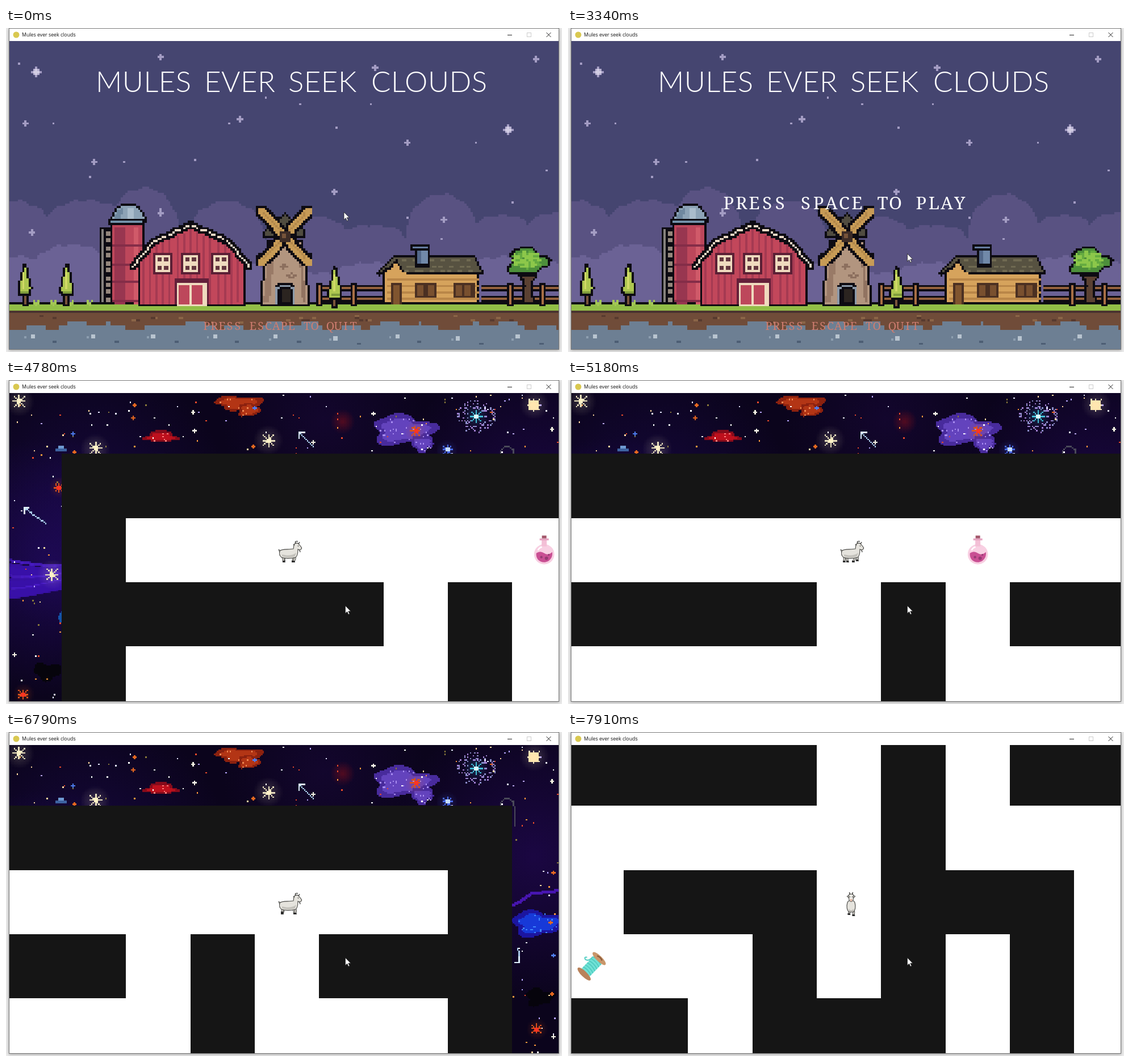
An HTML page with a canvas for the animation above (7990 ms loop, 979 by 572 pixels).

```html
<!DOCTYPE html>
<html lang="en">
<head>
<meta charset="utf-8">
<title>Mules ever seek clouds</title>
<style>
html, body { margin: 0; width: 100%; height: 100%; overflow: hidden; background: #ebebeb; }
#stage { position: relative; width: 979px; height: 572px; overflow: hidden; }
#frame { position: absolute; left: 5px; top: 0; width: 967px; height: 566px; border: 1px solid #777; background: #fff; box-shadow: 0 1px 5px #0005; }
canvas, svg { position: absolute; left: 0; top: 0; }
.pixels { left: 6px; top: 23px; width: 967px; height: 544px; image-rendering: pixelated; }
.typed { font-family: "Noto Serif", serif; font-weight: 100; text-anchor: middle; }
</style>
</head>
<body>
<div id="stage">
  <div id="frame"></div>
  <canvas id="farm" class="pixels" width="256" height="144"></canvas>
  <canvas id="space" class="pixels" width="384" height="216"></canvas>
  <canvas id="maze" width="979" height="572"></canvas>
  <svg width="979" height="572">
    <circle cx="18" cy="12" r="5.5" fill="#d9c850"/>
    <text x="28" y="15" font-size="8.8" font-family="'Open Sans', 'Noto Sans', sans-serif" fill="#111">Mules ever seek clouds</text>
    <path d="M883 12.5h8M951.5 8l8 8M959.5 8l-8 8" stroke="#222" fill="none"/>
    <rect x="917.5" y="8.5" width="7" height="7" stroke="#ccc" fill="none"/>
    <g id="menu">
      <text y="113" font-size="51" font-weight="300" font-family="Lato, sans-serif" letter-spacing=".5" fill="#fff"><tspan x="158">MULES</tspan><tspan x="349">EVER</tspan><tspan x="497">SEEK</tspan><tspan x="643">CLOUDS</tspan></text>
      <text id="play" class="typed" y="319.5" font-size="31" fill="#fff">PRESS SPACE TO PLAY</text>
      <text id="quit" class="typed" y="533" font-size="19.5" fill="#cf7d70">PRESS ESCAPE TO QUIT</text>
    </g>
    <path id="cursor" d="M0 0V13.500L3.200 10.600L5.400 15.500L7.500 14.500L5.300 9.800H9.500Z" fill="#fff" stroke="#222" stroke-width=".8"/>
  </svg>
</div>
<script>
const $ = id => document.getElementById(id);
const random = seed => () => (seed = seed * 16807 % 2147483647) / 2147483647;
const repeat = (n, f) => { for (let i = 0; i < n; i++) f(i); };
const clamp = (v, lo, hi) => Math.min(hi, Math.max(lo, v));
// Outline mirrored about x = cx, from points [offset, y].
const mirror = (cx, half) => [...half.map(([d, y]) => [cx + d, y]), ...half.map(([d, y]) => [cx - d, y]).reverse()];
// Lobed closed outline.
const lobed = (x, y, rx, ry, wave) => Array.from({ length: 48 }, (_, i) => {
  const a = i * Math.PI / 24, r = 1 + .16 * Math.sin(3 * a + wave) + .12 * Math.sin(5 * a + 2 * wave);
  return [x + Math.cos(a) * rx * r, y + Math.sin(a) * ry * r];
});

// Blocky painter: takes stage coordinates, snaps them to cells of size k.
function painter(id, k) {
  const g = $(id).getContext('2d');
  const X = x => Math.round((x - 5) / k), Y = y => Math.round((y - 23) / k);
  const S = n => Math.max(1, Math.round(n / k));
  const box = (c, x, y, w = k, h = w) => { g.fillStyle = c; g.fillRect(X(x), Y(y), S(w), S(h)); };
  const line = (c, pts, w = k) => {
    for (let i = 1; i < pts.length; i++) {
      const [x, y] = pts[i - 1], dx = pts[i][0] - x, dy = pts[i][1] - y;
      const n = Math.ceil(Math.max(Math.abs(dx), Math.abs(dy)) / k) || 1;
      repeat(n + 1, j => box(c, x + dx * j / n - w / 2, y + dy * j / n - w / 2, w));
    }
  };
  const poly = (c, pts, edge) => {
    const q = pts.map(([x, y]) => [(x - 5) / k, (y - 23) / k]), ys = q.map(p => p[1]);
    g.fillStyle = c;
    for (let r = Math.floor(Math.min(...ys)); r <= Math.max(...ys); r++) {
      const m = r + .5, xs = [];
      q.forEach(([x, y], i) => {
        const [a, b] = q[(i + 1) % q.length];
        if ((y <= m) !== (b <= m)) xs.push(Math.round(x + (m - y) * (a - x) / (b - y)));
      });
      xs.sort((a, b) => a - b);
      for (let i = 0; i + 1 < xs.length; i += 2) g.fillRect(xs[i], r, xs[i + 1] - xs[i], 1);
    }
    if (edge) line(edge, [...pts, pts[0]]);
  };
  const columns = (c, top) => {
    for (let x = 5; x < 974; x += k) box(c, x, top(x), k, 570 - top(x));
  };
  const glow = (c, x, y, r) => {
    const u = X(x), v = Y(y), s = r / k, grad = g.createRadialGradient(u, v, 0, u, v, s);
    grad.addColorStop(0, c);
    grad.addColorStop(1, c.slice(0, 7) + '00');
    g.fillStyle = grad;
    g.fillRect(u - s, v - s, 2 * s, 2 * s);
  };
  const plus = (c, x, y, arm = 1) => {
    const w = (2 * arm + 1) * k;
    box(c, x - w / 2, y - k / 2, w, k);
    box(c, x - k / 2, y - w / 2, k, w);
  };
  return { box, line, poly, columns, glow, plus };
}

function paintFarm() {
  const k = 967 / 256, ink = '#0d0b12', rnd = random(71);
  const { box, line, poly, columns, plus } = painter('farm', k);
  // Puffy skyline: the highest of several half ellipses [centre, radius, top].
  const puffs = (base, list) => x => 2 * Math.sin(x / 5) + Math.min(base, ...list.map(([c, r, top]) =>
    base - (base - top) * Math.sqrt(Math.max(0, 1 - ((x - c) / r) ** 2))));
  box('#454570', 5, 23, 970, 544);
  columns('#595282', puffs(372, [[10, 75, 305], [140, 90, 304], [240, 65, 282], [385, 68, 306], [530, 70, 330], [640, 60, 348], [765, 65, 293], [870, 60, 330], [965, 60, 327]]));
  columns('#6b6295', puffs(432, [[20, 50, 403], [112, 70, 382], [200, 60, 405], [400, 80, 417], [640, 60, 415], [890, 90, 403]]));

  const star = '#a39cc3';
  for (const p of [[270, 51], [933, 56], [32, 170], [410, 161], [707, 204], [153, 238], [578, 289], [270, 327], [769, 340], [44, 361], [648, 72]]) plus(star, ...p);
  repeat(16, i => box(star, 20 + i * 62, 60 + rnd() * 310));
  for (const [x, y] of [[52, 77], [882, 179]]) {
    plus(star, x, y, 2);
    box('#b5aed0', x - 1.5 * k, y - 1.5 * k, 3 * k);
    plus('#d2cde3', x, y);
  }

  // ground
  columns('#704c39', () => 499);
  box('#4b3430', 5, 499, 970, 4);
  repeat(26, i => box(i % 2 ? '#8b6547' : '#573a2f', 8 + rnd() * 955, 507 + rnd() * 10, 7, 5));
  columns('#6d7f93', x => 525 + 4 * Math.sign(Math.sin(x / 29)) + 3 * Math.sign(Math.sin(x / 11)));
  repeat(9, i => {
    const x = 42 + i * 107, y = 538 + rnd() * 5;
    box('#b8c4cf', x, y, 7);
    box('#8d9eaf', x - 9, y + 5, 5);
    box('#4d5e74', x + 40, y + 12, 9, 5);
  });
  box('#92be47', 5, 486, 970, 13);
  box(ink, 5, 482, 970, 4);
  repeat(4, i => line('#a3c655', [[48 + i * 31, 482], [52 + i * 31, 490], [56 + i * 31, 482]]));

  // fence
  for (const [a, w] of [[547, 117], [836, 139]]) for (const y of [455, 472]) {
    box(ink, a, y, w, 13);
    box('#95623d', a, y + 4, w, 5);
  }
  for (const x of [551, 610, 886, 945]) {
    box(ink, x - 6, 449, 12, 41);
    box('#a86f45', x - 2, 453, 4, 34);
  }

  // silo and ladder
  box(ink, 164, 351, 22, 137);
  box('#85817d', 167, 355, 4, 130);
  for (let y = 359; y < 484; y += 13) box('#94877c', 175, y, 8, 6);
  poly('#bd475b', mirror(214, [[28, 346], [28, 487]]), ink);
  box('#983650', 189, 350, 18, 136);
  box('#d05a69', 224, 350, 6, 136);
  for (let y = 381; y < 487; y += 33) box('#842d48', 188, y, 53, 4);
  const dome = r => Array.from({ length: 13 }, (_, i) => [214 - r * Math.cos(i * Math.PI / 12), 341 - r * Math.sin(i * Math.PI / 12)]);
  poly('#8da3b6', dome(30), ink);
  poly('#6f889f', dome(26).slice(0, 6).concat([[200, 340]]));
  box('#aabccb', 213, 318, 12, 21);
  box(ink, 180, 338, 66, 12);
  box('#7391a8', 184, 342, 58, 4);

  // barn
  const barn = mirror(325, [[0, 352], [63, 379], [93, 412], [93, 488]]);
  poly('#c2475b', barn, ink);
  for (let x = 238; x < 416; x += 12) {
    const d = Math.abs(x - 325), top = 356 + d * .43 + Math.max(0, d - 63) * .65;
    box('#a53a52', x, top, 4, 487 - top);
  }
  for (const [c, w] of [[ink, 12], ['#e9d8c4', 4]]) for (const s of [-1, 1])
    line(c, [[325, 348], [325 + s * 65, 377], [325 + s * 103, 421]], w);
  for (let x = 264; x < 390; x += 15) box(ink, x, 346 + Math.abs(x - 325) * .45, 4);
  for (let x = 257; x < 380; x += 51) {
    box('#5b1f35', x, 397, 35, 38);
    box('#efdabe', x + 4, 402, 27, 29);
    for (const a of [7, 19]) for (const b of [405, 419]) box('#63363f', x + a, b, 8, 8);
  }
  box('#64203a', 295, 444, 60, 44);
  box('#efdabe', 299, 448, 51, 40);
  for (const x of [303, 327]) for (const y of [452, 474]) box('#bd475b', x, y, 19, y > 460 ? 14 : 19);

  // windmill
  poly('#b2957f', mirror(490, [[30, 376], [38, 430], [43, 488]]), ink);
  poly('#997a67', [[464, 380], [473, 380], [463, 484], [451, 484]]);
  poly('#917361', [[514, 380], [518, 380], [528, 484], [521, 484]]);
  for (const [x, y] of [[488, 420], [502, 437]]) line('#8c6f5e', [[x - 6, y], [x, y - 4], [x + 6, y], [x, y + 4], [x - 6, y]]);
  poly('#504c40', mirror(490, [[0, 328], [16, 342], [36, 362], [36, 370]]), ink);
  poly(ink, mirror(491, [[10, 449], [18, 458], [18, 488]]));
  line('#8b99a9', mirror(491, [[14, 486], [14, 461], [8, 454]]));
  box('#2b2420', 484, 463, 14, 23);
  for (const s of [-1, 1]) {
    const arm = d => [[490 - s * d, 368 - d * 1.1], [490 + s * d, 368 + d * 1.1]];
    line(ink, arm(40), 19);
    line('#c79b56', arm(40), 11);
    line('#b3884b', arm(36));
  }
  box('#3d2c26', 482, 360, 17);
  box('#76533a', 486, 364, 9);

  // cottage
  poly('#d6a35c', [[666, 487], [666, 434], [684, 413], [704, 430], [832, 430], [832, 487]], ink);
  for (let y = 444; y < 486; y += 11) box('#b98648', 669, y, 162, 3);
  poly('#575241', [[682, 404], [824, 404], [838, 434], [704, 434], [685, 411], [658, 436], [654, 433]], ink);
  repeat(24, i => box('#706a52', 696 + i % 8 * 16 + i % 3 * 3, 410 + Math.floor(i / 8) * 8, 8, 4));
  box(ink, 718, 388, 28, 33);
  box('#7189a9', 722, 391, 19, 27);
  box('#53688a', 722, 391, 7, 27);
  box(ink, 713, 380, 35, 12);
  box('#657ca0', 717, 384, 27, 4);
  box('#4b3022', 677, 448, 20, 39);
  box('#80552f', 681, 452, 12, 35);
  for (const x of [720, 786]) {
    box('#4b3022', x, 448, 36, 27);
    for (const a of [4, 20]) box('#79502f', x + a, 452, 12, 19);
  }

  // trees
  for (const [x, y] of [[32, 416], [106, 416], [578, 421]]) {
    box(ink, x - 6, y + 55, 12, 20);
    box('#79543a', x - 2, y + 56, 4, 16);
    poly('#adc650', mirror(x, [[1, y], [6, y + 22], [11, y + 42], [10, y + 56]]), ink);
    box('#d0d966', x - 4, y + 14, 5, 32);
    box('#7f9b3c', x - 7, y + 48, 15, 5);
  }
  poly('#5b4132', mirror(918, [[14, 436], [6, 456], [10, 486]]), ink);
  poly('#4d8f3b', lobed(917, 412, 33, 23, 1), ink);
  repeat(90, i => {
    const a = i * 2.4, r = Math.sqrt(i / 90);
    box(i % 3 ? '#8cc74a' : '#65ab40', 913 + Math.cos(a) * r * 25, 407 + Math.sin(a) * r * 15, 4 + 4 * rnd(), 4);
  });
}

function paintSpace() {
  const k = 967 / 384, rnd = random(929), { box, line, poly, glow, plus } = painter('space', k);
  box('#0b041c', 5, 23, 970, 544);
  glow('#1c0a5099', 150, 210, 240);
  glow('#2a0c7a88', 80, 330, 230);
  glow('#25095c99', 930, 220, 260);
  glow('#1a083c88', 560, 70, 180);
  glow('#8b101888', 592, 74, 22);

  // drifting bands
  repeat(9, i => {
    const band = Array.from({ length: 17 }, (_, j) => [6 + j * 20, 318 + i * 7 + 9 * Math.sin(j / 2.5 + i * .3) - j * j * i * .018]);
    line(i % 3 ? '#3a12a899' : '#4a1cc899', band, 4 + i % 3 * 4);
  });
  const nebula = (x, y, rx, ry, dim, lit, dots, wave) => {
    poly(dim, lobed(x, y, rx, ry, wave));
    poly(lit, lobed(x, y, rx * .75, ry * .7, wave));
    repeat(Math.round(rx * ry / 50), () => {
      const a = rnd() * 6.28, r = Math.sqrt(rnd()) * .85;
      box(dots, x + Math.cos(a) * rx * r, y + Math.sin(a) * ry * r);
    });
  };
  nebula(250, 326, 20, 17, '#3a14b0', '#4219c4', '#7f5cff', 1);
  nebula(145, 427, 54, 36, '#1353a8', '#1477cf', '#53b7f5', 2);
  nebula(698, 88, 54, 26, '#482b9c', '#6343bd', '#a88cf0', 1.5);
  nebula(732, 112, 20, 14, '#482b9c', '#6343bd', '#a88cf0', 3);
  nebula(408, 40, 42, 12, '#8b210f', '#b33515', '#ef8751', 2.5);
  nebula(426, 53, 18, 12, '#8b210f', '#b33515', '#ef8751', 1);
  nebula(272, 100, 28, 10, '#850b1b', '#bd101d', '#ff7a78', 0);
  nebula(136, 502, 16, 7, '#5e3b16', '#956026', '#d49a4c', 0);
  nebula(229, 219, 16, 9, '#383848', '#686878', '#aaaabd', 4);
  nebula(935, 338, 46, 22, '#1c15a0', '#1739d8', '#3f86ff', 2);
  line('#4715b0', [[891, 306], [925, 286], [973, 280]], 5);
  line('#4a4a58', mirror(882, [[13, 165], [12, 126], [4, 117]]), 3);
  for (const [x, y] of [[170, 178], [72, 514], [938, 468]]) poly('#06040c', lobed(x, y, 24, 15, x));

  const tints = ['#e8e8ff', '#ffffff', '#ffd9a0', '#ff9a3c', '#e84a2a', '#b9a6ff', '#8a7a3a'];
  repeat(430, () => box(tints[Math.floor(rnd() * 7)], 8 + rnd() * 962, 25 + rnd() * 540));
  repeat(56, i => plus(['#f4f2e4', '#e8681f', '#4e7df0'][i % 5 % 3], 15 + i * 211 % 950, 35 + rnd() * 520));

  const flare = (x, y, c, core, r) => {
    glow(c + '38', x, y, r * 2.4);
    for (const s of [-1, 1]) line(c, [[x - r * .8, y - s * r * .8], [x + r * .8, y + s * r * .8]]);
    plus(c, x, y, Math.round(r / k));
    box(core, x - r * .4, y - r * .4, r * .8);
  };
  for (const p of [[22, 38], [157, 121], [462, 107], [80, 344], [276, 411], [928, 44]]) flare(...p, '#e8dfbd', '#fff2c8', 11);
  box('#ffe6b0', 920, 36, 17);
  for (const p of [[271, 147], [776, 123], [189, 403]]) flare(...p, '#4668e8', '#c4dcff', 8);
  for (const p of [[92, 190], [720, 90], [29, 555], [933, 524]]) flare(...p, '#d8521c', '#ff3422', 8);
  repeat(95, i => {
    const a = i * 2.4, r = 12 + 22 * Math.sqrt(rnd());
    box(i % 2 ? '#a27fd0' : '#8b8cc8', 826 + Math.cos(a) * r, 63 + Math.sin(a) * r * .85);
  });
  flare(827, 64, '#43bfd8', '#d8ffff', 9);
  // comets: head and tail offset
  for (const [x, y, dx, dy] of [[515, 93, 25, 24], [31, 226, 38, 27], [273, 217, 30, -27], [314, 506, -26, -25], [904, 407, -3, -25]]) {
    line('#a9c9e8', [[x, y], [x + dx, y + dy]]);
    line('#dcedfa', [[x, y + Math.sign(dy) * 9], [x, y], [x + Math.sign(dx) * 9, y]]);
  }
  box('#3d62a0', 86, 121, 19, 4);
  box('#6f9ad2', 91, 117, 9, 5);
}

const rows = [
  '###########',
  '#.........#',
  '#####.#.###',
  '#.....#...#',
  '#.###.###.#',
  '#...#.#.#.#',
  '###.###.#.#'];
const tile = 113.3, homeX = 438, homeY = 243.6;
const ctx = $('maze').getContext('2d');

const shape = (d, fill, stroke, w = 1) => {
  const p = new Path2D(d);
  if (fill) { ctx.fillStyle = fill; ctx.fill(p); }
  if (stroke) { ctx.strokeStyle = stroke; ctx.lineWidth = w; ctx.stroke(p); }
};
const at = (x, y, draw) => { ctx.save(); ctx.translate(x, y); draw(); ctx.restore(); };
const disc = (x, y, r) => `M${x - r} ${y}a${r} ${r} 0 1 0 ${2 * r} 0a${r} ${r} 0 1 0 ${-2 * r} 0Z`;
const dark = '#474744', wool = '#e5e3dd';

function leg(x, y, a, b) {
  const d = `M${x} ${y}L${(x + a) / 2 + 1} ${(y + b) / 2}L${a} ${b}`;
  shape(d, null, dark, 4);
  shape(d, null, '#cfcdc7', 2.2);
  shape(`M${a - 2} ${b - 2.5}h4l1 3h-5z`, '#2c2c2c');
}

function goatSide(pose) {
  [489, 486, 505, 509].forEach((hip, i) => {
    const phase = (pose + i) * Math.PI / 2;
    leg(hip, 310, hip + 3 * Math.sin(phase), 321.5 - 2 * Math.max(0, Math.cos(phase)));
  });
  shape('M484 302L480 299L482 305', wool, dark);
  shape('M482 302C485 297 498 300 506 298L507 291C509 287 514 287 516 290L520.5 296C521 299 517 301 514 299C514 305 513 311 510 313C500 316 490 315 485 313C481 310 481 306 482 302Z', wool, dark, 1.1);
  shape('M486 311C495 314 503 314 509 311L511 305C503 311 494 310 486 308Z', '#c3c1bb');
  shape('M510 289C508 285 511 284 514 285M515 290L517 286M517 300L518 304M508 292L506 290', null, dark, 1.4);
  shape(disc(514.5, 293, .8), '#222');
}

function goatFront(pose) {
  const step = pose % 2 ? 1 : -1;
  leg(495, 312, 494.5, 323.5 - step);
  leg(502, 312, 502.5, 323.5 + step);
  shape('M492 301C494 296 503 296 505 301C507 308 506 315 502 318H495C491 315 490 308 492 301Z', wool, dark, 1.1);
  shape('M494 312Q498.5 318 503 312L502 317H495Z', '#bdbbb5');
  shape('M495 289L491 290L494 293M502 289L506 290L503 293', wool, dark);
  shape('M494 288Q498.5 284 503 288L502 297Q498.5 302 495 297Z', '#eeece7', dark, 1.1);
  shape('M496.5 287L495.5 283M500.5 287L501.5 283', null, dark, 1.6);
  shape('M496.5 295h4l-1 4h-2z', '#e2b39f');
  shape(disc(496.3, 291, .8) + disc(500.7, 291, .8), '#222');
}

function potion() {
  shape(disc(0, 7, 17.8), '#f8cfe2');
  shape('M-4.5 -19h9v12h-9z', '#f3bfd6');
  shape('M-14 5Q-7 0 0 5T14 3C16 12 9 21 0 21S-15 14 -14 5Z', '#c94f93');
  shape(disc(-5, 12, 2.2) + disc(4, 14, 3) + disc(8, 8, 1.6), '#963a72');
  shape('M-8 -21h16v3.5h-16z', '#e6a5c2');
  shape('M-4 -26h8v5h-8z', '#a4586c');
  shape('M-11 0Q-9 -5 -4 -6', null, '#fff', 2.5);
}

function spool() {
  ctx.rotate(-.8);
  shape('M-15 -10H15V10H-15Z', '#70e1d5');
  for (let x = -11; x < 15; x += 5) shape(`M${x} -10Q${x + 3} 0 ${x - 1} 10`, null, '#48c5ba', 1.3);
  for (const x of [-19, 19]) {
    ctx.fillStyle = x < 0 ? '#b9825a' : '#c9976b';
    ctx.beginPath();
    ctx.ellipse(x, 0, 5, 15.5, 0, 0, 7);
    ctx.fill();
  }
  shape('M20 -6Q23 0 20 6', null, '#8d5d3d', 2.5);
  ctx.rotate(.8);
  shape('M2 -17Q-5 -8 -11 -12Q-14 -17 -8 -16', null, '#55cfc4', 2);
}

const loop = 7990, beat = 80, start = 3500, pause = 6060, resume = 6550;
const hops = (t, from, every, most) => clamp(Math.floor((t - from) / every) + 1, 0, most);

function drawMaze(now) {
  const resting = now >= pause && now < resume;
  const origin = now < resume ? start : resume, beats = Math.floor((now - origin) / beat);
  const t = origin + beats * beat;
  const right = hops(t, 4150, 340, 6), back = hops(t, 6830, 340, 2), down = hops(t, 7300, 280, 3);
  const gx = 1 + right - back, gy = 1 + down, pose = resting ? 2 : beats % 4;
  const left = c => Math.round(homeX + (c - gx) * tile), top = r => Math.round(homeY + (r - gy) * tile);
  ctx.clearRect(0, 0, 979, 572);
  ctx.save();
  ctx.beginPath();
  ctx.rect(6, 23, 967, 544);
  ctx.clip();
  rows.forEach((row, r) => [...row].forEach((cell, c) => {
    ctx.fillStyle = cell === '#' ? '#151515' : '#fff';
    ctx.fillRect(left(c), top(r), left(c + 1) - left(c), top(r + 1) - top(r));
  }));
  const half = tile / 2;
  if (right < 6) at(left(7) + half, top(1) + half, potion);
  at(left(1) + half, top(5) + half, spool);
  if (down) goatFront(pose);
  else if (back) at(997, 0, () => { ctx.scale(-1, 1); goatSide(pose); });
  else goatSide(pose);
  ctx.restore();
}

function moveCursor(t) {
  const p = clamp(Math.floor((t - 900) / beat) / 8, 0, 1), lift = clamp(Math.floor((t - 1790) / beat), 0, 2);
  const y = 325 + 76.5 * p * p * (3 - 2 * p) - 1.5 * lift;
  $('cursor').setAttribute('transform', `translate(${595 + 2.5 * p} ${y})`);
}

// Monospaced setting: each letter centred in a cell of equal width.
const typeset = (id, x, cell) =>
  $(id).setAttribute('x', [...$(id).textContent].map((_, i) => x + (i + .5) * cell).join(' '));
const show = (id, on) => { $(id).style.visibility = on ? 'visible' : 'hidden'; };

function tick() {
  const t = performance.now() % loop, playing = t >= start;
  show('farm', !playing);
  show('space', playing);
  show('maze', playing);
  show('menu', !playing);
  show('play', !playing && t >= 410 && Math.floor((t - 410) / 488.3) % 2 === 0);
  if (playing) drawMaze(t);
  moveCursor(t);
  requestAnimationFrame(tick);
}

typeset('play', 271.5, 22.6);
typeset('quit', 346.5, 13.6);
paintFarm();
paintSpace();
tick();
</script>
</body>
</html>
```
